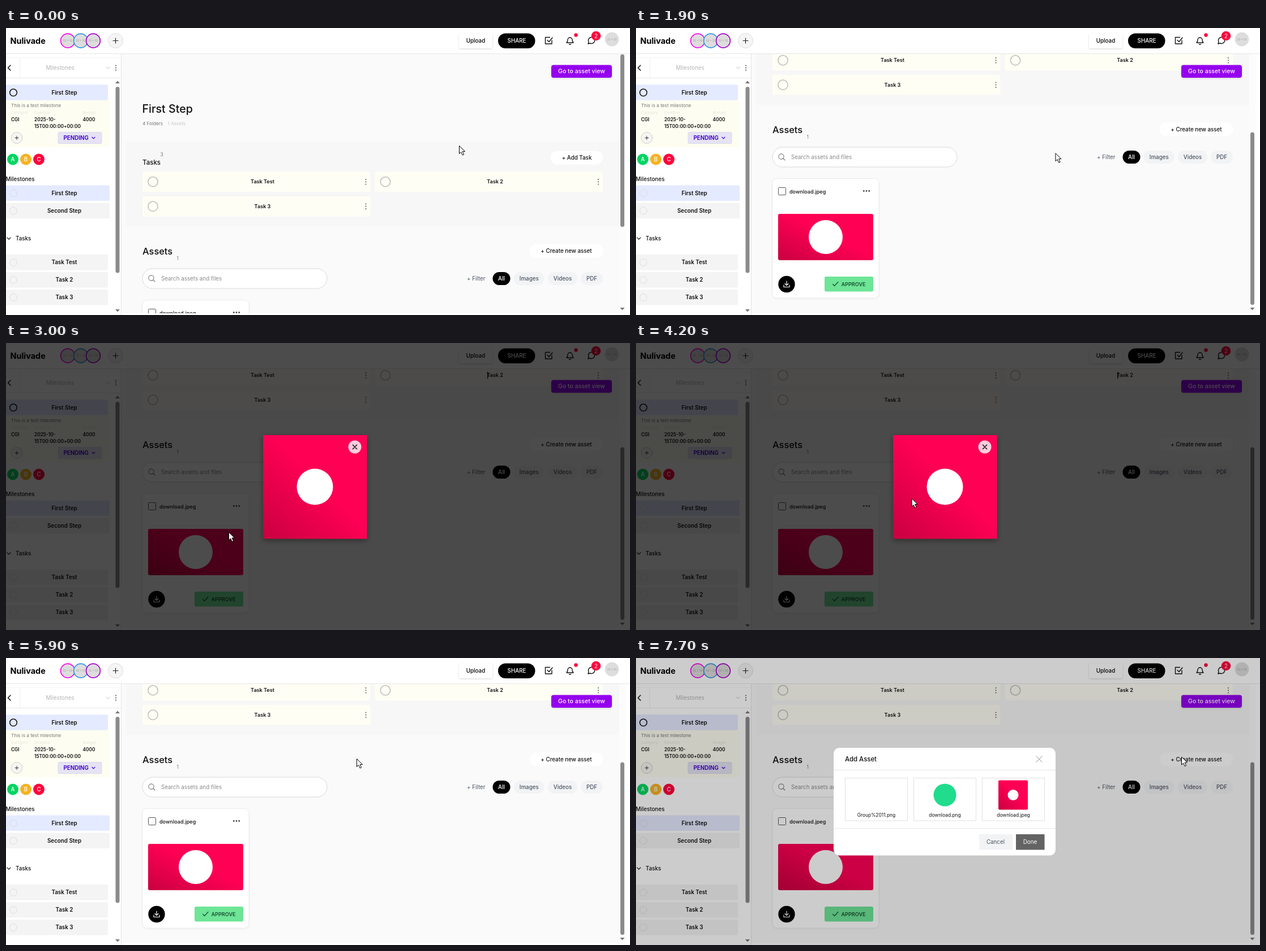
Write an HTML page that moves like this. It is 1102 by 508 pixels and loops after 8 s.

```html
<!DOCTYPE html>
<html lang="en">
<head>
<meta charset="utf-8">
<title>Milestone board</title>
<style>
html, body { margin: 0; width: 100%; height: 100%; overflow: hidden; background: #fff; }
svg { display: block; width: 100vw; height: 100vh; font-family: Inter, Roboto, sans-serif; }
</style>
</head>
<body>
<svg id="stage" viewBox="0 0 1102 508" xmlns="http://www.w3.org/2000/svg"></svg>
<script>
const LOOP = 8000, STEP = 100;

// Markup helpers
const rect = (x, y, w, h, fill, r = 0, more = '') =>
  `<rect x="${x}" y="${y}" width="${w}" height="${h}" rx="${r}" fill="${fill}" ${more}/>`;
const circle = (x, y, r, fill, stroke = 'none', w = 1) =>
  `<circle cx="${x}" cy="${y}" r="${r}" fill="${fill}" stroke="${stroke}" stroke-width="${w}"/>`;
const line = (d, color, w = 1) =>
  `<path d="${d}" fill="none" stroke="${color}" stroke-width="${w}" stroke-linecap="round" stroke-linejoin="round"/>`;
const shape = (d, fill) => `<path d="${d}" fill="${fill}"/>`;
const text = (x, y, s, size = 9.8, weight = 400, fill = '#111', anchor = 'start') =>
  `<text x="${x}" y="${y}" font-size="${size}" font-weight="${weight}" fill="${fill}" text-anchor="${anchor}">${s}</text>`;
const mid = (x, y, s, size, weight, fill) => text(x, y, s, size, weight, fill, 'middle');
const dots = (x, y, dx, dy, r, color) =>
  [-1, 0, 1].map(i => circle(x + i * dx, y + i * dy, r, color)).join('');
const plus = (x, y, n, color, w) => line(`M${x - n} ${y}h${2 * n}M${x} ${y - n}v${2 * n}`, color, w);
const cross = (x, y, n, color, w) =>
  line(`M${x - n} ${y - n}l${2 * n} ${2 * n}M${x + n} ${y - n}l${-2 * n} ${2 * n}`, color, w);
const chevron = (x, y, n, color, w) => line(`M${x - n} ${y - n / 2}l${n} ${n}l${n} ${-n}`, color, w);

function avatar(x, y, ring) {
  return circle(x, y, 12.4, '#ddd', ring, ring ? 1.7 : 0) + mid(x, y + 1.7, '32 × 32', 4.6, 400, '#999');
}

function header() {
  return rect(0, 0, 1102, 45, '#fff') + rect(0, 45, 1102, 1, '#e6e6e6') +
    text(7.5, 28, 'Nulivade', 14.4, 700, '#000') +
    avatar(109, 22.5, '#f0e') + avatar(132, 22.5, '#39d') + avatar(154, 22.5, '#a0c') +
    circle(193.5, 22.5, 13, '#f5f5f5', '#ddd') + plus(193.5, 22.5, 4.5, '#222', 1.2) +
    rect(800, 10, 59, 26, '#fff', 3, 'filter="url(#soft)"') + mid(829.5, 26, 'Upload', 9.8, 500, '#000') +
    rect(869, 9.5, 65.5, 26.5, '#000', 13.2) + mid(902, 26, 'SHARE', 9.8, 500, '#fff') +
    line('M964 22v6h-11.500v-11.500h8M956 21.500l3 3 6-7.500', '#111', 1.4) +
    line('M990 26q2-2 2-5a4 4 0 0 1 8 0q0 3 2 5zM994.500 28.500q1.500 1.500 3 0', '#111', 1.4) +
    circle(1006.500, 12.500, 3.2, '#ff003c') +
    line('M1028 28l1-3.500a5.600 5.600 0 1 1 2.500 2.500z', '#111', 1.4) +
    circle(1042, 14, 8.3, '#ff003c') + mid(1042, 17.6, '2', 9.8, 400, '#fff') +
    avatar(1070, 20, '');
}

function sideRow(y, label, w, fill, ring = '#ddd', ringWidth = 1) {
  return rect(0, y, w, 27.5, fill, 2) + circle(13, y + 14, 6.3, 'none', ring, ringWidth) +
    mid(103, y + 17.3, label, 9.8, 600);
}

function sidebar() {
  const badge = (x, s, color) => circle(x, 232.5, 10, color) + mid(x, 236.200, s, 9.8, 500, '#fff');
  const tag = (x, s) => text(x, 152, s, 6.8, 400, '#e4e4dc');
  const val = (x, y, s) => text(x, y, s, 8.3, 600, '#111');
  return rect(0, 46, 203, 462, '#fff') + rect(203, 46, 1, 462, '#e3e3e3') +
    rect(0, 88, 203, 1, '#e8e8e8') + rect(24, 52, 1, 36, '#eee') + rect(0, 52, 203, 1, '#f3f3f3') +
    line('M8 66l-4.500 4.500 4.500 4.500', '#111', 1.5) + mid(95.5, 73.500, 'Milestones', 9.8, 400, '#b4b4b4') +
    chevron(180.5, 70.5, 3, '#bbb', 1) + dots(194, 70.5, 0, 4, 1, '#444') +
    rect(0, 128, 183, 83, '#fdfdf1') + sideRow(100.3, 'First Step', 180, '#e4eaff', '#111', 1.5) +
    text(9, 139.5, 'This is a test milestone', 8.2, 400, '#777') +
    tag(9, 'Category') + tag(50, 'Deadline') + tag(135.500, 'Budget') +
    val(9, 164.5, 'CGI') + val(50, 164.5, '2025-10-') + val(50, 177, '15T00:00:00+00:00') + val(135.5, 164.5, '4000') +
    circle(19, 194.5, 9.8, '#f6f6f2', '#ccc') + plus(19, 194.5, 3, '#333', 1) +
    rect(92, 184.5, 77, 20, '#e5e3f4', 2, 'stroke="#dcd9ee"') + text(101.5, 198, 'PENDING', 9.8, 700, '#4b0bd0') +
    chevron(154.500, 194.5, 2.5, '#4b0bd0', 1.2) +
    badge(12, 'A', '#00d563') + badge(35, 'B', '#f5b324') + badge(58, 'C', '#ff003c') +
    text(-0.5, 271, 'Milestones', 9.8, 500) +
    sideRow(278.5, 'First Step', 183, '#e4eaff') + sideRow(309.5, 'Second Step', 183, '#f4f4f4') +
    chevron(5, 372.5, 3, '#222', 1.2) + text(17, 375.700, 'Tasks', 9.8, 500) +
    ['Task Test', 'Task 2', 'Task 3'].map((s, i) => sideRow(401 + 31 * i, s, 180, '#f4f4f4')).join('') +
    rect(193.5, 104, 7, 329.5, '#8b8b8b', 3.5) +
    shape('M193 98h8l-4-4.500zM193 498h8l-4 4.500z', '#777');
}

function task(x, y, label) {
  return rect(x, y, 402.5, 35.5, '#fffef5', 4) + circle(x + 18.5, y + 17.7, 8.6, 'none', '#bdbdbd', 1.5) +
    mid(x + 212, y + 20.6, label, 9.1, 600) + dots(x + 394.5, y + 17.7, 0, 4.3, 1, '#555');
}

function pill(x, y, w, h, label, fill, color, id = '') {
  return rect(x, y, w, h, fill, h / 2, id && `id="${id}"`) + mid(x + w / 2, y + h / 2 + 3.5, label, 9.8, 500, color);
}

// Page content in unscrolled coordinates
function content() {
  const chip = (x, w, s) => pill(x, 432, w, 23, s, '#f2f3f5', '#4b5563');
  return rect(212, 201, 871, 150, '#f7f7f7') +
    text(240.5, 149.5, 'First Step', 19.6, 500) +
    text(241, 171.5, '4 Folders', 8.2, 400, '#777') + text(285.5, 171.5, '1 Assets', 8.2, 400, '#c6c6c6') +
    text(272.500, 227, '3', 8.4, 400, '#777') + text(241, 242, 'Tasks', 11.5, 500) +
    pill(962, 217.5, 92, 24, '+ Add Task', '#fff', '#111') +
    task(241, 254.5, 'Task Test') + task(651.5, 254.5, 'Task 2') + task(241, 298, 'Task 3') +
    rect(850, 266, 1.2, 12, '#000', 0, 'id="caret"') +
    text(241, 400.5, 'Assets', 16.4, 500) + text(301.5, 411, '1', 8.4, 400, '#777') +
    pill(924.5, 382.5, 130, 24, '+ Create new asset', '#fff', '#111', 'create') +
    rect(241, 426, 326, 35, '#fff', 17.5, 'stroke="#d9d9d9"') +
    circle(256.500, 442.5, 4.6, 'none', '#777', 1.1) + line('M260 446l3 3', '#777', 1.1) +
    text(274, 447, 'Search assets and files', 9.8, 400, '#8a8a8a') +
    text(814, 447, '+ Filter', 9.8, 400, '#4b5563') + pill(859.5, 432, 31, 23, 'All', '#000', '#fff') +
    chip(897, 53.5, 'Images') + chip(957, 52, 'Videos') + chip(1015, 39, 'PDF') +
    rect(241, 481.5, 188, 211.5, '#fff', 8, 'stroke="#ececec" filter="url(#faint)"') +
    rect(251.5, 497.5, 13, 13, '#fff', 1, 'stroke="#555"') + text(271, 507.5, 'download.jpeg', 9.1, 500) +
    dots(407, 503.5, 4.7, 0, 1.4, '#444') +
    rect(251, 544, 168, 82, 'url(#red)', 3) + circle(335, 585, 30, '#fff') +
    circle(266, 668.5, 14.7, '#000') +
    line('M266 663v7M263 667.500l3 3 3-3M261 670v3.500h10v-3.500', '#fff', 1.2) +
    rect(333, 655, 86, 26.5, '#6ee597', 3) + line('M347.500 668.500l3 3 6.500-7', '#1d5034', 1.3) +
    text(362.5, 671.7, 'APPROVE', 9.1, 600, '#1d5034');
}

function viewer() {
  return rect(454, 163, 183.5, 183.5, 'url(#red)', 0, 'filter="url(#deep)"') + circle(545.5, 254.5, 32, '#fff') +
    `<circle id="close" cx="616" cy="184" r="11.5" fill="#fff"/>` + cross(616, 184, 3.6, '#222', 1.5);
}

function tile(x, label, art = '') {
  return rect(x + .5, 212.5, 110, 75.5, '#fff', 0, 'stroke="#e0e0e0"') + art + mid(x + 55.5, 281, label, 8.4, 400);
}

function dialog() {
  return rect(349, 159, 392, 190.5, '#fff', 10) + text(369, 182.8, 'Add Asset', 11.4, 500) +
    cross(712, 179, 5, '#bbb', 1.2) + rect(349, 198, 392, 1, '#e6e6e6') + rect(349, 301, 392, 1, '#e6e6e6') +
    tile(369, 'Group%2011.png') + tile(490, 'download.png', circle(545.5, 242.5, 20, '#20dc8c')) +
    tile(611, 'download.jpeg', rect(640, 216.5, 52, 52, 'url(#red)', 2) + circle(666, 242.5, 9.5, '#fff')) +
    rect(606, 312, 59, 27.5, '#f2f3f5') + mid(635, 329, 'Cancel', 9.8, 400, '#4b5563') +
    rect(671, 312, 50.5, 27.5, '#636363') + mid(696, 329, 'Done', 9.8, 400, '#fff');
}

const outlined = (id, d, more = '') =>
  `<g id="${id}"><path d="${d}" fill="#fff" stroke="#000" stroke-linejoin="round"/>${more}</g>`;
const shadow = (id, dy, blur, alpha) =>
  `<filter id="${id}" x="-20%" y="-30%" width="140%" height="170%"><feDropShadow dx="0" dy="${dy}" stdDeviation="${blur}" flood-opacity="${alpha}"/></filter>`;

const $ = id => document.getElementById(id);
$('stage').innerHTML = `<defs>
  <linearGradient id="red" x1="0" y1="1" x2="1" y2="0">
    <stop offset="0" stop-color="#c90040"/><stop offset=".55" stop-color="#ff0055"/><stop offset="1" stop-color="#ff0055"/>
  </linearGradient>
  <clipPath id="port"><path d="M204 46h898v459h-898z"/></clipPath>
  ${shadow('soft', 1, 1.5, .16)}${shadow('faint', 1, 1.5, .06)}${shadow('deep', 3, 5, .4)}</defs>` +
  rect(0, 0, 1102, 508, '#fff') + rect(204, 46, 888, 459, '#fafafa') +
  `<g clip-path="url(#port)"><g id="page">${content()}</g></g>` +
  rect(1083, 46, 12, 459, '#fcfcfc') + rect(1085, 0, 7, 305.5, '#8b8b8b', 3.5, 'id="thumb"') +
  shape('M1084.500 495h8l-4 4.500z', '#777') +
  rect(963, 65.5, 107, 22.5, '#9500ee', 4, 'filter="url(#soft)"') + mid(1016.5, 80.3, 'Go to asset view', 10.5, 500, '#fff') +
  sidebar() + header() + rect(0, 0, 1102, 508, '#000', 0, 'id="shade"') +
  `<g id="viewer">${viewer()}</g><g id="dialog">${dialog()}</g><g id="cursor">` +
  outlined('arrow', 'M.5 .5V14.500l3.200-3 2.500 5.500 2.400-1-2.400-5.500h4.300z') +
  outlined('hand', 'M-1 .8q1.300-.8 2 .5l1 4 5 1q2 .6 1.700 2.700l-.7 4.500h-7l-4.500-4q-.5-1.500 1.500-1.200l2 1z',
    line('M2.500 9v2.500M4.500 9v2.500M6.500 9v2.500', '#000', .7)) + '</g>';

// Motion: [time, value, ...]
const scroll = [[1100, 0], [1200, 12], [1300, 40], [1400, 78.5], [1500, 140], [1600, 203], [1700, 203], [1800, 215]];
const pointer = [[0, 800, 208], [400, 841, 209], [500, 841, 209], [600, 847, 204], [800, 838, 188], [1100, 838, 188],
  [1200, 836, 191], [1700, 836, 191], [2600, 406, 327], [2800, 393, 334.5], [3400, 393, 334.5], [3600, 395, 335],
  [3800, 395, 335], [4700, 601, 200], [5000, 619, 178], [6200, 619, 178], [6700, 800, 184], [7100, 963, 174.5]];
const fade = [[7200, 0], [7300, .02], [7400, .55], [7500, 1]];

function at(keys, t) {
  const i = keys.findIndex(k => k[0] > t);
  if (i < 0) return keys[keys.length - 1].slice(1);
  if (!i) return keys[0].slice(1);
  const a = keys[i - 1], b = keys[i], f = (t - a[0]) / (b[0] - a[0]);
  return a.slice(1).map((v, j) => v + (b[j + 1] - v) * f);
}
const within = (t, ...spans) => spans.some(([a, b]) => t >= a && t < b);
const set = (id, name, value) => $(id).setAttribute(name, value);
const show = (id, on) => set(id, 'visibility', on ? 'visible' : 'hidden');

function draw(t) {
  const [s] = at(scroll, t), [lead] = at(scroll, t + 20), [x, y] = at(pointer, t), [f] = at(fade, t);
  const viewing = within(t, [3000, 5300]);
  const hand = within(t, [1400, 1500], [2600, 3000], [4900, 5300], [7000, 7400]);
  set('page', 'transform', `translate(0 ${-s})`);
  set('thumb', 'y', 46.5 + lead * .642);
  show('caret', within(t, [1200, 1800], [2400, 3600], [4200, 4800], [5300, 5900], [6500, 7100]));
  show('create', !within(t, [7300, 7400]));
  set('shade', 'opacity', viewing ? .7 : f * .2);
  show('viewer', viewing);
  set('close', 'fill-opacity', t >= 4900 ? 1 : .8);
  set('dialog', 'opacity', f < .1 ? 0 : f);
  set('dialog', 'transform', t < 7700 ? 'translate(-7 23)' : '');
  set('cursor', 'transform', `translate(${x} ${y})`);
  show('arrow', !hand);
  show('hand', hand);
}

function tick(now) {
  draw(Math.floor(now % LOOP / STEP) * STEP);
  requestAnimationFrame(tick);
}
draw(0);
requestAnimationFrame(tick);
</script>
</body>
</html>
```
